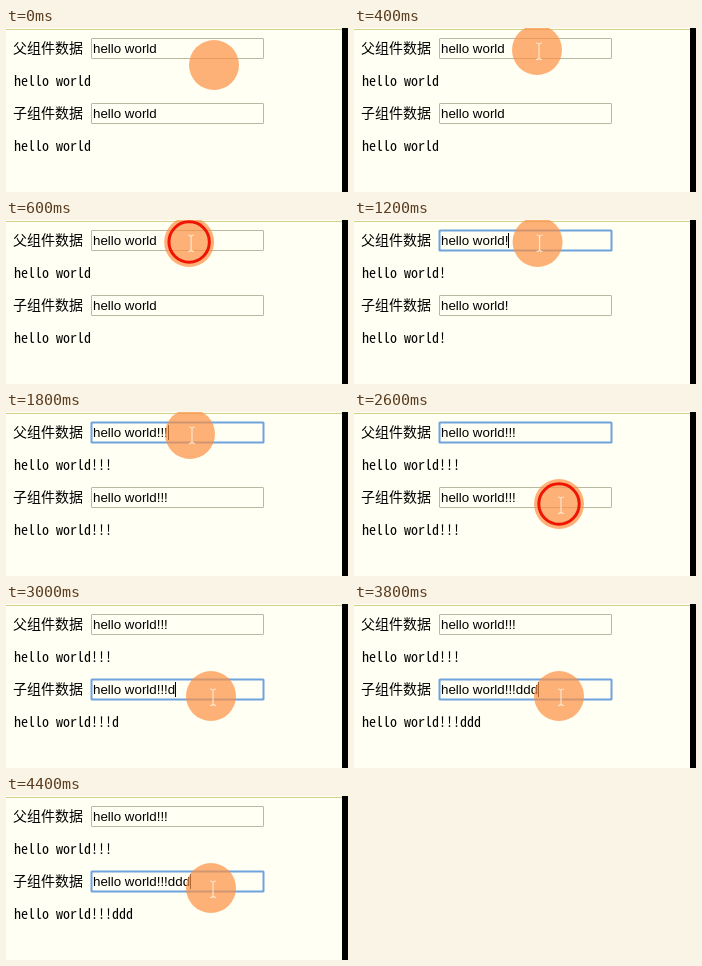
An HTML page that plays this animation: 342x164 px, repeating every 4600 ms.

```html
<!DOCTYPE html>
<html lang="zh-CN">
<head>
<meta charset="utf-8">
<title>父子组件数据</title>
<style>
  html, body { margin: 0; width: 100%; height: 100%; overflow: hidden; background: #fffff3; }
  svg { display: block; width: 342px; height: 164px; }
  text { fill: #000; white-space: pre; }
  .label { font: 14px "Noto Sans CJK SC", "Noto Sans CJK", sans-serif; }
  .value { font: 13.333px "Liberation Sans", Arial, sans-serif; }
  .echo {
    font: 14px "Noto Sans Mono CJK SC", "Noto Sans CJK SC", monospace;
    font-feature-settings: "hwid";
  }
  .box { fill: #fffff3; stroke: #b9b9a2; stroke-width: 1; }
  .box.focus { stroke: #6fa3de; stroke-width: 2; }
  .caret { fill: #000; }
</style>
</head>
<body>
<svg viewBox="0 0 342 164">
  <rect width="342" height="164" fill="#fffff3"/>
  <rect y="1" width="336" height="1" fill="#d3cf8c"/>
  <g id="fields"></g>
  <g id="pointer">
    <circle r="25" fill="#fd9044" opacity=".7"/>
    <circle id="ring" r="20.2" fill="none" stroke="#ee1505" stroke-width="3"/>
    <path id="beam" d="M-1 -7q2.500 0 3 1.500q.5 -1.500 3 -1.500M2 -5.500V8M-1 9.500q2.500 0 3 -1.500q.5 1.500 3 1.500"
      fill="none" stroke="#fff0dc" stroke-width="1.200" opacity=".85"/>
  </g>
  <rect x="336" width="6" height="164" fill="#000"/>
</svg>
<script>
const NS = "http://www.w3.org/2000/svg";
const LOOP = 4600, STEP = 200;
const $ = id => document.getElementById(id);

function add(parent, tag, attrs, content) {
  const el = document.createElementNS(NS, tag);
  for (const key in attrs) el.setAttribute(key, attrs[key]);
  if (content) el.textContent = content;
  return parent.appendChild(el);
}

function makeField(label, y) {
  const g = add($("fields"), "g", { transform: `translate(0 ${y})` });
  add(g, "text", { class: "label", x: 7, y: 15 }, label);
  return {
    box: add(g, "rect", { class: "box", x: 85.5, y: .5, width: 172, height: 20, rx: .5 }),
    value: add(g, "text", { class: "value", x: 87, y: 15 }),
    caret: add(g, "rect", { class: "caret", y: 3, width: 1, height: 15 }),
    echo: add(g, "text", { class: "echo", x: 8, y: 48 })
  };
}

const parent = makeField("父组件数据", 10);
const child = makeField("子组件数据", 75);

// Pointer keys: time, x, y
const path = [[0, 208, 37], [400, 183, 22], [1800, 184, 22],
              [2000, 192, 52], [2200, 196, 77], [2400, 205, 92]];

const within = (t, from, to) => t >= from && t < to;
const typed = (char, times, t) => char.repeat(times.filter(k => t >= k).length);
const show = (el, on) => el.setAttribute("visibility", on ? "visible" : "hidden");

function pointerAt(t) {
  const i = path.findIndex(k => k[0] > t);
  if (i < 0) return path[path.length - 1].slice(1);
  const a = path[i - 1], b = path[i];
  const p = (t - a[0]) / (b[0] - a[0]);
  return [a[1] + (b[1] - a[1]) * p, a[2] + (b[2] - a[2]) * p];
}

function setField(field, text, focus, caret) {
  if (field.value.textContent !== text) {
    field.value.textContent = field.echo.textContent = text;
    field.caret.setAttribute("x", Math.round(87 + field.value.getComputedTextLength()));
  }
  field.box.classList.toggle("focus", focus);
  show(field.caret, focus && caret);
}

function draw(ms) {
  const t = Math.floor(ms % LOOP / STEP) * STEP;
  const text = "hello world" + typed("!", [1200, 1400, 1800], t);
  const both = text + typed("d", [3000, 3200, 3400], t);
  setField(parent, text, within(t, 800, 2800), t < 2400);
  setField(child, both, t >= 2800, !within(t, 4000, 4400));
  $("pointer").setAttribute("transform", `translate(${pointerAt(t).join(" ")})`);
  show($("ring"), t === 600 || t === 2600);
  show($("beam"), within(t, 400, 2000) || t >= 2400);
}

const start = performance.now();
function tick() {
  draw(performance.now() - start);
  requestAnimationFrame(tick);
}
tick();
</script>
</body>
</html>
```
